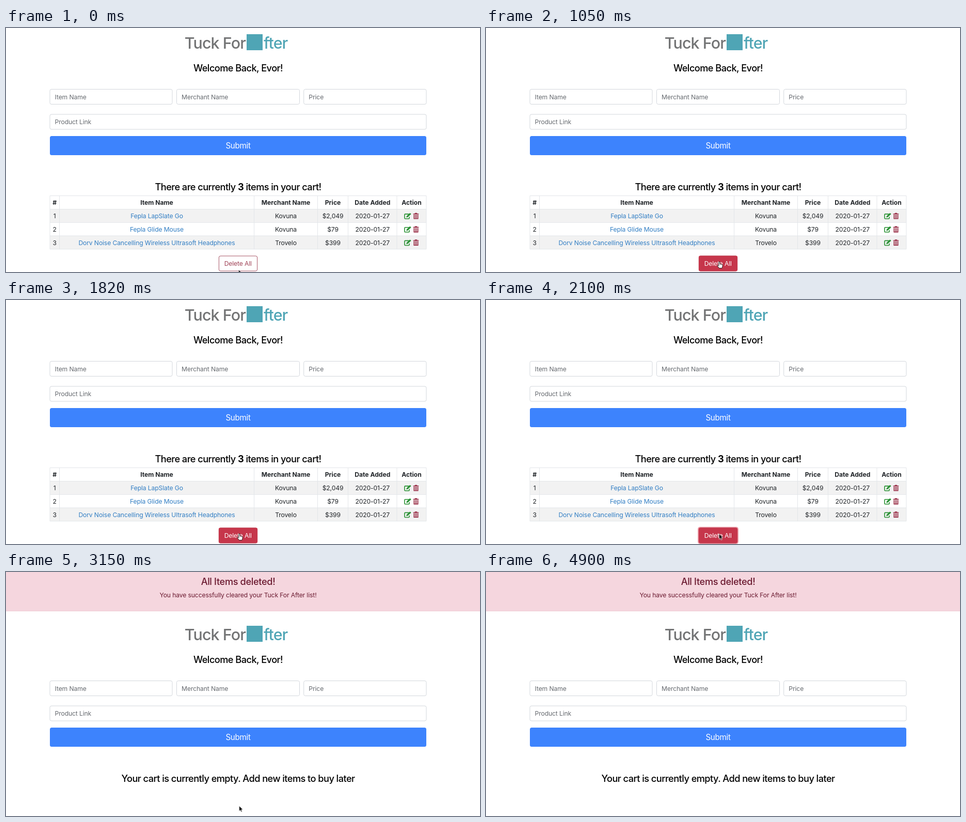
An HTML page that plays this animation: 918 by 472 pixels, repeating every 4970 ms.

```html
<!DOCTYPE html>
<html lang="en">
<head>
<meta charset="utf-8">
<title>Wish list</title>
<style>
  html, body { margin: 0; width: 100%; height: 100%; overflow: hidden; background: #fff; }
  svg { display: block; width: 918px; height: 472px; }
  text {
    font: 400 12.15px Inter, "Open Sans", sans-serif;
    font-optical-sizing: none;
    letter-spacing: -.01em;
    fill: #212529;
  }
  .mid { text-anchor: middle; }
  text.head { font-size: 18.2px; font-weight: 500; letter-spacing: -.03em; fill: #000; }
  text.brand { font-size: 30.4px; font-weight: 500; letter-spacing: -.03em; fill: #737475; }
  text.teal { fill: #4fa5b5; }
  text.hint { fill: #676b70; }
  text.submit { font-size: 15.2px; letter-spacing: -.02em; fill: #fff; }
  text.th { font-weight: 700; letter-spacing: 0; }
  text.link { fill: #337fc4; }
  text.red { fill: #a04256; }
  text.white { fill: #fff; }
  text.alert { fill: #6b1a30; }
  text.head.alert { letter-spacing: -.02em; }
  .field rect { fill: #fff; stroke: #d3d7dc; }

  /* One loop is 71 ticks of 70 ms */
  .page, .cart, .done, .hot, .ring, .arrow, .hand, .arrowPath, .handPath {
    animation: 4970ms step-end infinite;
  }
  .page { animation-name: page; }
  .cart { animation-name: cart; }
  .done { animation-name: done; }
  .hot { animation-name: hot; }
  .ring { animation-name: ring; }
  .arrow { animation-name: arrow; }
  .hand { animation-name: hand; }
  .arrowPath { animation-name: arrowPath; }
  .handPath { animation-name: handPath; }

  @keyframes page { 0% { transform: translateY(0); } 43.66%, 100% { transform: translateY(92px); } }
  @keyframes cart { 0% { opacity: 1; } 43.66%, 100% { opacity: 0; } }
  @keyframes done { 0% { opacity: 0; } 43.66%, 100% { opacity: 1; } }
  @keyframes hot { 0% { opacity: 0; } 1.4% { opacity: .3; } 2.81% { opacity: .8; } 4.22%, 100% { opacity: 1; } }
  @keyframes ring { 0% { opacity: 0; } 38.02% { opacity: .5; } 39.43%, 100% { opacity: 1; } }
  @keyframes arrow { 0% { opacity: 1; } 2.81% { opacity: 0; } 40.84% { opacity: 1; } 98.59%, 100% { opacity: 0; } }
  @keyframes hand { 0% { opacity: 0; } 2.81% { opacity: 1; } 40.84%, 100% { opacity: 0; } }
  @keyframes handPath {
    0% { transform: translate(451px, 454px); }
    4.22% { transform: translate(451px, 451px); }
    5.63% { transform: translate(451px, 450px); }
    14.08% { transform: translate(451.5px, 451px); }
    18.3%, 100% { transform: translate(452px, 452px); }
  }
  @keyframes arrowPath {
    0% { transform: translate(450.5px, 467.5px); }
    1.4% { transform: translate(451px, 460px); }
    2.81% { transform: translate(451.5px, 452.3px); }
    77.46% { transform: translate(474px, 451px); }
    78.87% { transform: translate(540px, 445px); }
    81.69% { transform: translate(737px, 398px); animation-timing-function: steps(2); }
    84.5% { transform: translate(804px, 392px); animation-timing-function: steps(5); }
    91.54% { transform: translate(838px, 404px); animation-timing-function: steps(5); }
    98.59%, 100% { transform: translate(918px, 474px); }
  }
</style>
</head>
<body>
<svg viewBox="0 0 918 472">
  <defs>
    <g id="edit" fill="none" stroke="#2a9134">
      <path d="M9.2 2.2H2.3Q.9 2.2.9 3.6V9.9Q.9 11.3 2.3 11.3H8.8Q10.2 11.3 10.2 9.9V7.6" stroke-width="1.6"/>
      <path d="M4.3 8.7 4.7 6.4 10.6.5 13 2.9 7 8.4Z" fill="#2a9134" stroke="none"/>
      <path d="M11.2.8 13 2.6" stroke-width="1.7"/>
    </g>
    <g id="trash" fill="none" stroke="#94233d">
      <path d="M.2 1.9H10.8M3.5 1.6 4 .6H7L7.5 1.6" stroke-width="1.3"/>
      <path d="M1.7 3V11.2H9.3V3" stroke-width="1.4"/>
      <path d="M3.9 3V11M5.5 3V11M7.1 3V11" stroke-width=".9"/>
    </g>
  </defs>

  <g class="done">
    <rect width="918" height="76" fill="#f5d6de"/>
    <rect y="75" width="918" height="1" fill="#f0cbd4"/>
    <text class="head alert mid" x="449.5" y="25">All Items deleted!</text>
    <text class="alert mid" x="449.5" y="49">You have successfully cleared your Tuck For After list!</text>
    <text class="head mid" x="449.5" y="406">Your cart is currently empty. Add new items to buy later</text>
  </g>

  <g class="page">
    <text class="brand" x="464" y="40" text-anchor="end">Tuck For</text>
    <rect x="466" y="12" width="31" height="31" fill="#4fa5b5"/>
    <text class="brand teal" x="499" y="40">fter</text>
    <text class="head mid" x="449.5" y="83.5">Welcome Back, Evor!</text>
    <g id="fields" class="field"></g>
    <rect x="85" y="209" width="729" height="37" rx="3.5" fill="#3d83fd"/>
    <text class="submit mid" x="449.5" y="233">Submit</text>
  </g>

  <g class="cart">
    <text class="head mid" x="449.5" y="314">There are currently <tspan font-weight="700">3</tspan> items in your cart!</text>
    <g id="table"></g>
    <rect class="ring" x="410" y="438.8" width="79" height="33.2" rx="4.5" fill="#eda0ab"/>
    <rect x="412.4" y="441" width="74.2" height="29" rx="3" fill="#fff" stroke="#a85466"/>
    <text class="red mid" x="449.3" y="460">Delete All</text>
    <g class="hot">
      <rect x="411.9" y="440.5" width="75.2" height="30" rx="3.2" fill="#c6364b"/>
      <text class="white mid" x="449.3" y="460">Delete All</text>
    </g>
  </g>

  <g class="hand"><path class="handPath" fill="#fff" stroke="#111" stroke-width=".9" stroke-linejoin="round"
    d="M-1.1 1.2A1.1 1.1 0 0 1 1.1 1.2V4.8L5.1 5.7Q6.4 6.1 6.3 7.5L5.8 10.2 4.8 12.6H-.4L-3.6 8.4Q-4.2 7-3 6.7L-1.1 8Z"/></g>
  <g class="arrow"><path class="arrowPath" fill="#000" stroke="#fff" stroke-width=".8"
    d="M0 0V10.5L2.4 8.3 4 12 5.8 11.2 4.2 7.6H7.4Z"/></g>
</svg>
<script>
  const byId = id => document.getElementById(id);
  const label = (cls, x, y, str) => `<text class="${cls}" x="${x}" y="${y}">${str}</text>`;

  const field = (x, y, w, hint) =>
    `<rect x="${x}" y="${y}" width="${w}" height="29" rx="3"/>` + label("hint", x + 9.6, y + 19, hint);
  byId("fields").innerHTML =
    field(85, 118.5, 237, "Item Name") + field(330.5, 118.5, 238, "Merchant Name") +
    field(576.7, 118.5, 237.3, "Price") + field(85, 167, 729, "Product Link");

  const edges = [85, 103.5, 480.5, 603.5, 662.5, 757, 814];
  const lines = [324.5, 350.5, 376.3, 402, 427.8];
  const heads = ["#", "Item Name", "Merchant Name", "Price", "Date Added", "Action"];
  const items = [
    ["Fepla LapSlate Go", "Kovuna", "$2,049"],
    ["Fepla Glide Mouse", "Kovuna", "$79"],
    ["Dorv Noise Cancelling Wireless Ultrasoft Headphones", "Trovelo", "$399"]
  ];
  const center = col => (edges[col] + edges[col + 1]) / 2;

  let cells = heads.map((str, col) => label("th mid", center(col), 342, str)).join("");
  let stripes = "";
  items.forEach((item, i) => {
    const top = lines[i + 1], base = top + 17.6;
    if (i % 2 === 0) stripes += `<rect x="85" y="${top}" width="729" height="25.7" fill="#f2f2f2"/>`;
    [i + 1, ...item, "2020-01-27"].forEach((str, col) => {
      cells += label(col === 1 ? "link mid" : "mid", center(col), base, str);
    });
    cells += `<use href="#edit" x="771" y="${top + 7.2}"/><use href="#trash" x="788.5" y="${top + 7.2}"/>`;
  });
  const grid = lines.map(y => `M85 ${y}H814`).join("") + edges.map(x => `M${x} 324.5V427.8`).join("");
  byId("table").innerHTML = stripes + `<path d="${grid}" stroke="#e3e6e9" fill="none"/>` + cells;
</script>
</body>
</html>
```
